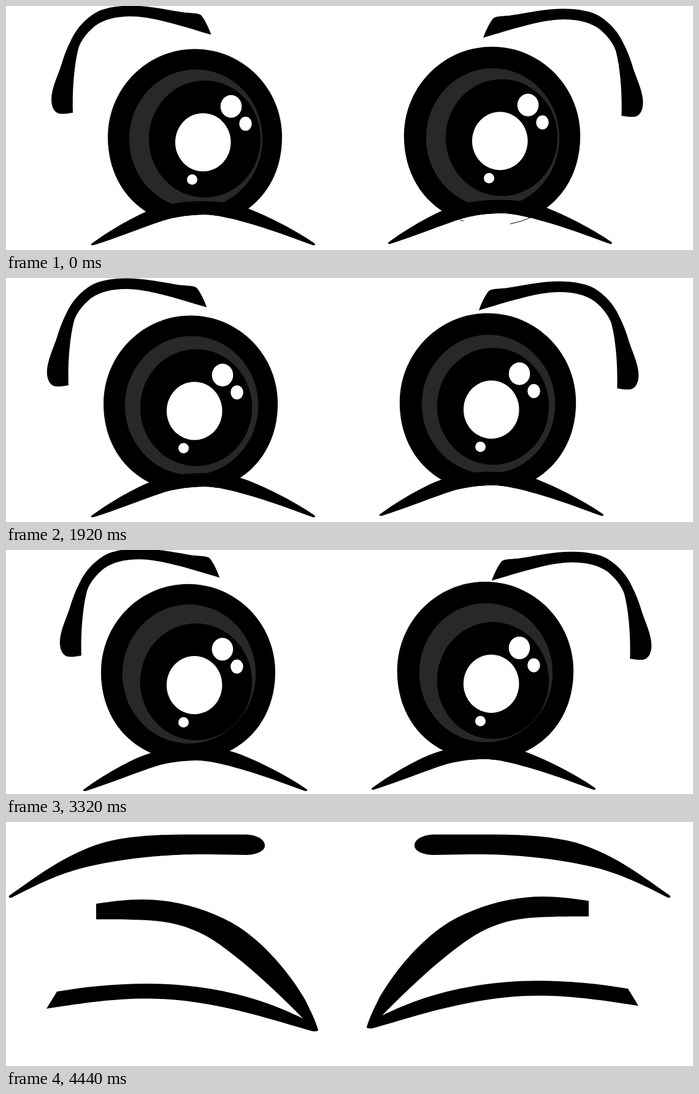
Recreate the animation shown at these times as an HTML page. Size 1120x400 px, loop 4.64 s.

```html
<!DOCTYPE html>
<html lang="en">
<head>
<meta charset="utf-8">
<title>Blinking eyes</title>
<style>
  html, body { margin: 0; width: 100%; height: 100%; overflow: hidden; background: #fff; }
  svg { display: block; width: 1120px; height: 400px; }
</style>
</head>
<body>
<svg viewBox="0 0 1120 400">
  <defs>
    <path id="ballShape" d="M166 215C166 135.2 229.6 70.5 308 70.5S450 135.2 450 215C450 299.5 391 359.5 308 359.5S166 299.5 166 215Z"/>
    <g id="pupilShape">
      <ellipse cx="324" cy="218" rx="91.2" ry="95.8"/>
      <g fill="#fff">
        <ellipse cx="321.2" cy="223.4" rx="45.3" ry="47.7"/>
        <ellipse cx="367" cy="164.6" rx="17.3" ry="18.6"/>
        <ellipse cx="390.5" cy="193" rx="10.3" ry="11.5"/>
        <circle cx="303.5" cy="284.5" r="8.5"/>
      </g>
    </g>
    <g id="lidShape">
      <!-- white area hides the iris below the lid -->
      <path fill="#fff" d="M143 392C183 379.5 225 361.5 262 350C280 345 300 342.5 322 342C345 342 370 349 395 356C440 369 480 385 500 392Z"/>
      <path d="M139 390C166 370 203 348 230 336.5C260 324 290 320 321 320C350 320 375 324 395 332C440 350 480 373 503 389Q506 393 500 392C480 385 440 369 395 356C370 349 345 342 322 342C300 342.5 280 345 262 350C225 361.5 183 379.5 143 392Q138 393 139 390Z"/>
    </g>
    <path id="browShape" d="M334.5 47C331 38 326 25 318.5 15.5C314 11 300 12 287 10C262 6 232 -.5 204 -.5C178 -.5 158 4 146 11C127 23 115 37 106 56C99 70 94 83 90 97C85 113 74 135 74 153C74 166 79 175 87 176.5C94 177.5 102 176 109 175C108 145 110 100 118.5 68C124 53 134 42 146 32C160 22 180 17 203 17C240 17 290 34 334.5 47Z"/>
    <path id="shutBrow" d="M5 121C45 93 95 53 158 34C195 24 240 20.5 290 20.5H388C408 20.5 422 28 422 38.5C422 48 408 54 390 54C370 54 350 53 330 53C280 52 200 57 130 74C85 85 50 103 9 124Q4 125 5 121Z"/>
    <path id="shutEye" d="M147 134C175 130 195 127 222 127C270 127 322 140 368 165C424 197 468 257 488 292C496 308 505 327 509 341Q508 344 500 343C440 327 340 290 232 289.5C180 289 130 296 66 306L83 278C130 270 180 265 230 265C300 265 370 277 425 297C450 306 470 315 484 322C450 287 402 240 350 202C312 174 273 163 230 161C200 159.5 170 159.5 147 159.5Z"/>
  </defs>

  <g id="open">
    <g id="iris">
      <use href="#ballShape"/>
      <use href="#ballShape" transform="translate(480.8 -4.6) scale(1.012)"/>
      <g fill="#282828">
        <ellipse cx="309.5" cy="218" rx="108.7" ry="114"/>
        <ellipse cx="793.5" cy="216" rx="108.7" ry="114"/>
      </g>
    </g>
    <g id="pupil">
      <use href="#pupilShape"/>
      <use href="#pupilShape" x="484" y="-2.2"/>
    </g>
    <use id="lidLeft" href="#lidShape"/>
    <g id="lid"><use href="#lidShape" x="484" y="-2.2"/></g>
    <path id="edge" d="M821.5 357.4Q840 354 857 346M741 351L746 352.5" fill="none" stroke="#000"/>
    <g id="brow">
      <use href="#browShape"/>
      <use href="#browShape" transform="translate(1112.5 5) scale(-1 1)"/>
    </g>
  </g>

  <g id="shut">
    <use href="#shutBrow"/>
    <use href="#shutBrow" transform="translate(1088 0) scale(-1 1)"/>
    <use href="#shutEye"/>
    <use href="#shutEye" transform="translate(1097 -4.7) scale(-1 1)"/>
  </g>
</svg>
<script>
const LOOP = 4640, STEP = 40, BLINK = 4440;
const BEATS = [0, 1920, 2800, 3340, BLINK];

const linear = p => p;
const easeOut = p => Math.sin(p * Math.PI / 2);

// Every part starts at rest and reaches one point per beat; only the first leg is eased.
const parts = {
  iris: { ease: linear, points: [[-7, -9], [-13.5, -7.8], [-11, -15], [0, 0]] },
  pupil: { ease: easeOut, points: [[-14, -5.5], [-22, .6], [-13.8, -2], [-5.8, -6.3]] },
  lid: { ease: easeOut, points: [[-14, 0], [-23, 3], [-27, 3], [-27, 0]] },
  brow: { ease: easeOut, points: [[-7.2, 1], [-4.3, 4.5], [14.5, -2], [0, 0]] }
};

const el = id => document.getElementById(id);
const show = (id, on) => el(id).style.display = on ? '' : 'none';
const move = (id, x, y) => el(id).setAttribute('transform', `translate(${x} ${y})`);
const progress = (t, from, to) => Math.min(1, Math.max(0, (t - from) / (to - from)));

function offsetAt({ ease, points }, t) {
  const leg = BEATS.findIndex(beat => beat > t) - 1;
  const p = progress(t, BEATS[leg], BEATS[leg + 1]);
  const k = leg ? p : ease(p);
  const from = leg ? points[leg - 1] : [0, 0];
  return from.map((v, axis) => v + (points[leg][axis] - v) * k);
}

function draw(now) {
  const t = Math.floor(now % LOOP / STEP) * STEP;
  const open = t < BLINK;
  show('open', open);
  show('shut', !open);
  if (!open) return;
  for (const id in parts) move(id, ...offsetAt(parts[id], t));
  // the left lid slides back towards its starting place halfway through the first leg
  const [x, y] = offsetAt(parts.lid, t);
  move('lidLeft', x + 14 * progress(t, 1120, 1680), y);
  show('edge', t < 160);
}

const start = performance.now();
function tick() {
  draw(performance.now() - start);
  requestAnimationFrame(tick);
}
tick();
</script>
</body>
</html>
```
